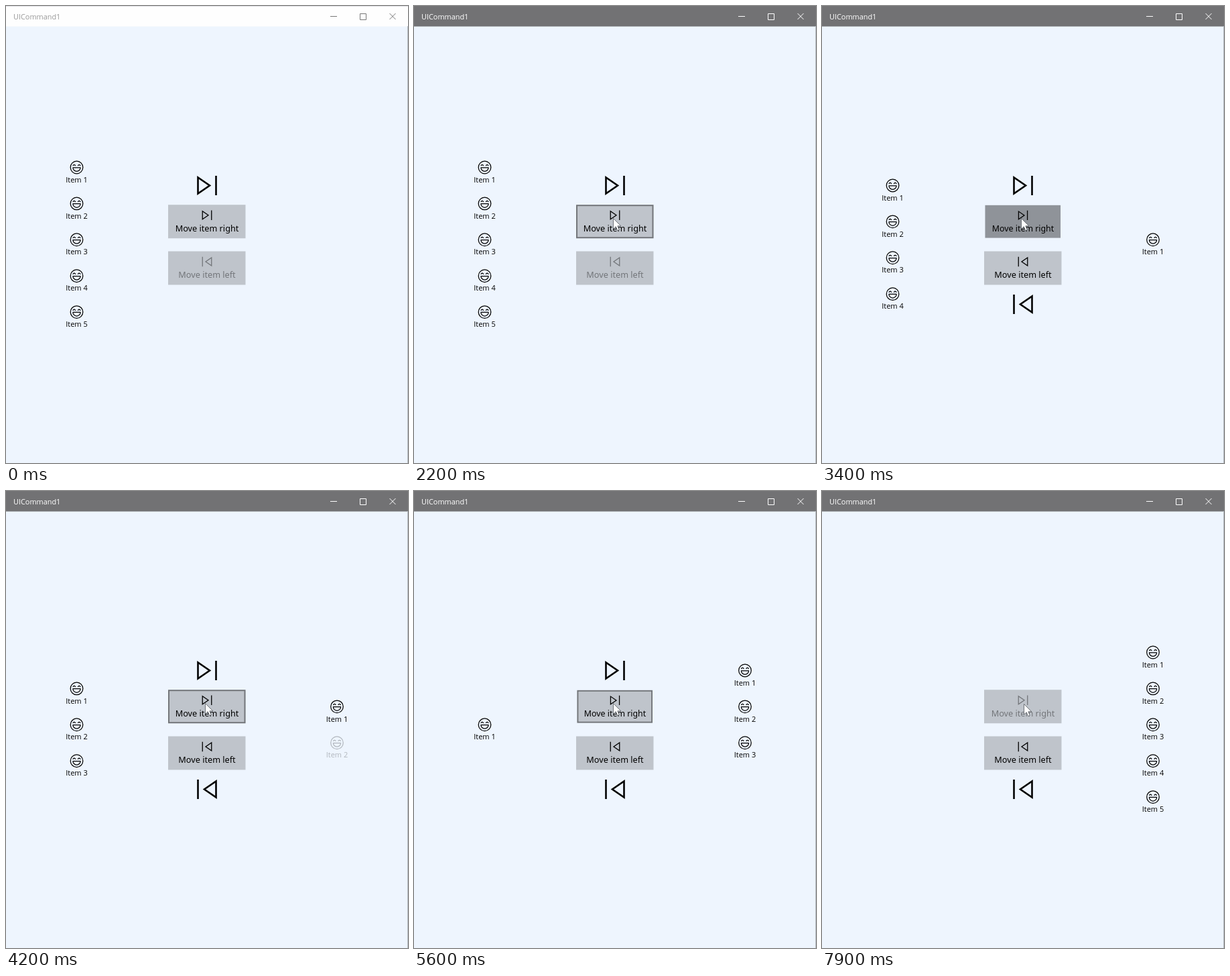
These frames come from a looping animation (600 by 681 pixels, 8000 ms). An HTML page:

```html
<!DOCTYPE html>
<html lang="en">
<head>
<meta charset="utf-8">
<title>UICommand1</title>
<style>
  html, body { margin: 0; width: 100%; height: 100%; overflow: hidden; background: #eef5fe; }
  svg { display: block; width: 600px; height: 681px; }
  text { font-family: "Open Sans", sans-serif; font-size: 11px; }
  .centered { text-anchor: middle; }
  .command { font-family: "Noto Sans", sans-serif; font-size: 12.7px; }
</style>
</head>
<body>
<svg viewBox="0 0 600 681">
  <defs>
    <g id="smiley" fill="none" stroke="#000" stroke-width="1.25" stroke-linecap="round" stroke-linejoin="round">
      <circle r="9.3"/>
      <path d="M-5.6 .3H5.6A5.6 5.6 0 0 1 -5.6 .3ZM-5.4 -2.8Q-3.7 -5.2 -2 -2.8M2 -2.8Q3.7 -5.2 5.4 -2.8"/>
    </g>
    <path id="next" d="M-13.5 -12V12L4 0ZM13.5 -14.5V14.5" fill="none" stroke="currentColor" stroke-width="2.6"/>
    <path id="pointer" d="M.5 .5V16.2L4.2 12.8L6.7 18.6L9.3 17.5L6.9 11.8H11.8Z" fill="#fff" stroke="#555a60" stroke-width=".8"/>
  </defs>
  <g id="scene"></g>
</svg>
<script>
const LOOP = 8000, STEP = 100;
const scene = document.getElementById("scene");

// Each move: when the command runs and when the new item starts to appear.
const moves = [
  { run: 2700, appear: 3100 },
  { run: 3800, appear: 4200 },
  { run: 4500, appear: 5100 },
  { run: 5500, appear: 6100 },
  { run: 6500, appear: 7100 }
];

// Look of the right-hand command button: [time, state, scale]
const buttonSteps = [
  [0, "rest", 1], [1500, "hover", 1],
  [2300, "pressed", 1], [2500, "pressed", .975], [2700, "hover", .975], [2900, "hover", 1],
  [3300, "pressed", 1], [3400, "pressed", .975], [3800, "hover", .975], [4000, "hover", 1],
  [4300, "pressed", .975], [4500, "hover", .975], [4800, "hover", 1],
  [5200, "pressed", .975], [5500, "hover", .975], [5800, "hover", 1],
  [6200, "pressed", .975], [6500, "rest", 1]
];

// Pointer path: [time, x, y]
const pointerSteps = [
  [200, 589, 510], [1000, 416, 386], [1200, 371, 359], [1400, 332, 336],
  [1700, 297, 316], [7800, 297, 316], [7900, 301, 317]
];

const clamp = v => Math.max(0, Math.min(1, v));

function pointerAt(t) {
  const i = pointerSteps.findLastIndex(p => p[0] <= t);
  if (i < 0) return null;
  const a = pointerSteps[i], b = pointerSteps[i + 1] || a;
  const k = b === a ? 0 : (t - a[0]) / (b[0] - a[0]);
  return [a[1] + (b[1] - a[1]) * k, a[2] + (b[2] - a[2]) * k];
}

const rowY = (i, count) => 348.3 + (i - (count - 1) / 2) * 53.9;

function item(x, y, number, opacity = 1) {
  if (opacity <= 0) return "";
  return `<g transform="translate(${x} ${y})" opacity="${opacity}">
    <use href="#smiley"/><text class="centered" y="22.2">Item ${number}</text></g>`;
}

function icon(y, scale, mirrored) {
  return `<use href="#next" transform="translate(300 ${y}) scale(${mirrored ? -scale : scale} ${scale})"/>`;
}

function button(y, label, mirrored, enabled, state = "rest", scale = 1) {
  const shade = state === "pressed" ? .4 : .2;
  const border = state === "hover"
    ? `<rect x="243" y="${y + 1}" width="113.5" height="48" fill="none" stroke="#000" stroke-opacity=".4" stroke-width="2"/>` : "";
  return `<g transform="translate(299.75 ${y + 25}) scale(${scale}) translate(-299.75 ${-y - 25})">
    <rect x="242" y="${y}" width="115.5" height="50" fill-opacity="${shade}"/>${border}
    <g color="#000" opacity="${enabled ? 1 : .4}">${icon(y + 15.5, .5, mirrored)}
    <text class="command centered" x="300" y="${y + 39.7}">${label}</text></g></g>`;
}

function titleBar(active) {
  const ink = active ? "#fff" : "#999";
  return `<rect width="600" height="30.5" fill="${active ? "#727274" : "#fefefe"}"/>
    ${active ? "" : '<rect width="600" height="1" fill="#e2e2e6"/>'}
    <rect x="599" y="30" width="1" height="651" fill="#b4b9c0"/>
    <text x="11" y="20" style="font-size:10.9px" fill="${ink}">UICommand1</text>
    <path d="M484 15.5H494M528.5 11.5H537.5V20.5H528.5ZM572.5 11L581.5 20M581.5 11L572.5 20"
      fill="none" stroke="${active ? "#fff" : "#777"}"/>`;
}

function lists(t, moved) {
  const left = 5 - moved;
  let out = "";
  for (let i = 0; i < left; i++) out += item(105.5, rowY(i, left), i + 1);
  if (moved) {
    const fade = 1 - clamp((t - moves[moved - 1].run + STEP) / 200);
    out += item(105.5, rowY(left, left + 1), left + 1, fade);
  }
  for (let i = 0; i < moved; i++) {
    out += item(494, rowY(i, moved), i + 1, clamp((t - moves[i].appear + STEP) / 400));
  }
  return out;
}

function render(t) {
  const moved = moves.filter(m => m.run <= t).length;
  const [, state, scale] = buttonSteps.findLast(s => s[0] <= t);
  const pointer = pointerAt(t);
  scene.innerHTML = titleBar(t >= 2200) + lists(t, moved)
    + (moved < 5 ? icon(267.5, 1, false) : "")
    + button(296.2, "Move item right", false, moved < 5, state, scale)
    + button(365.5, "Move item left", true, moved > 0)
    + (moved > 0 ? icon(444.5, 1, true) : "")
    + (pointer ? `<use href="#pointer" x="${pointer[0]}" y="${pointer[1]}"/>` : "");
}

const start = performance.now();
let shown = -1;
function tick() {
  const elapsed = (performance.now() - start) % LOOP;
  const t = Math.floor(elapsed / STEP) * STEP;
  if (t !== shown) render(shown = t);
  requestAnimationFrame(tick);
}
tick();
</script>
</body>
</html>
```
